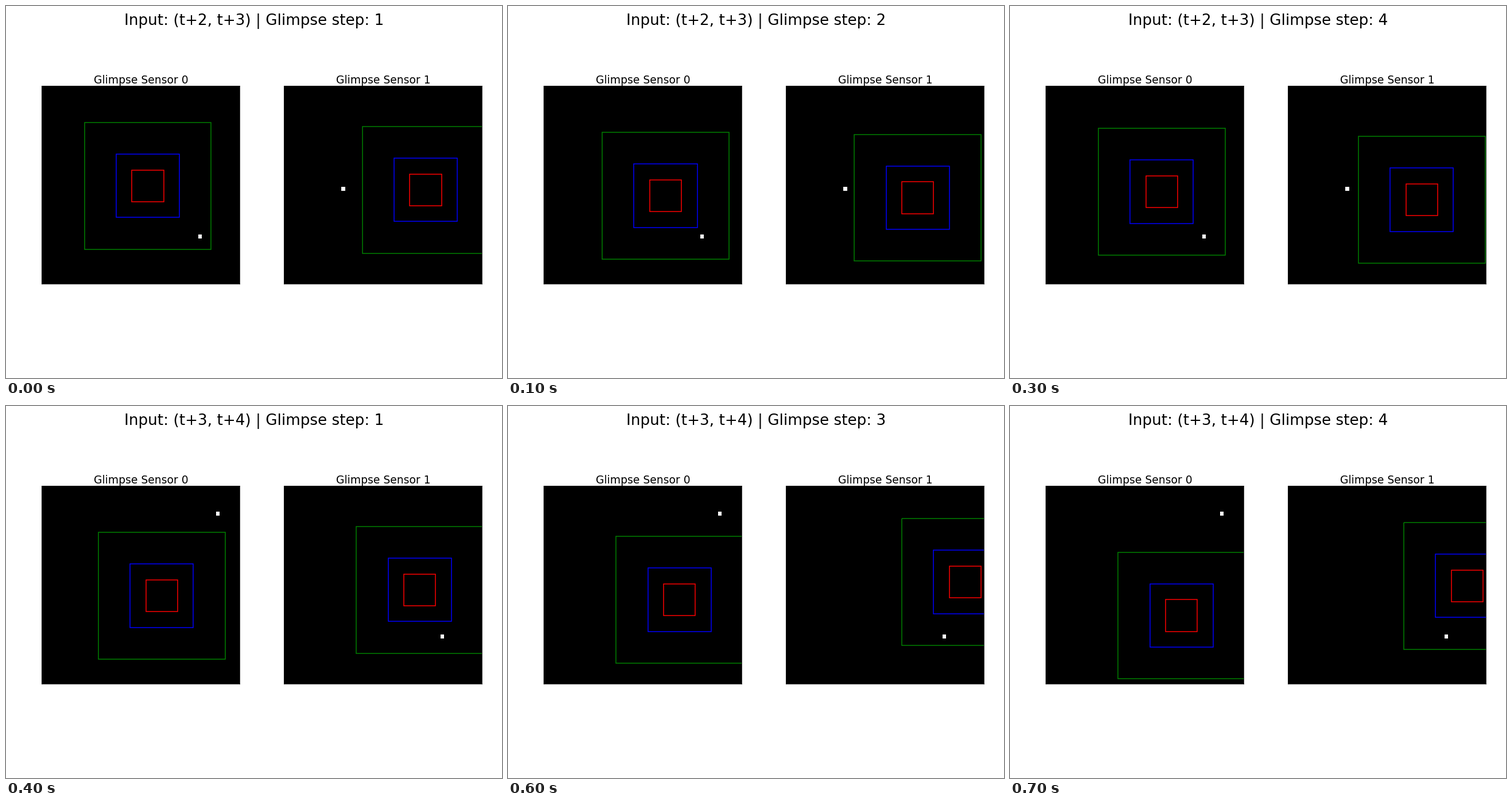
A matplotlib script that plays this animation: 864x648 px, repeating every 800 ms.

```python
import matplotlib.pyplot as plt
import numpy as np
from matplotlib.animation import FuncAnimation
from matplotlib.patches import Rectangle

WIDTH, HEIGHT, DPI = 864, 648, 54
GRID = 100                                # sensor resolution in cells
LEFT, TOP, SIDE, PITCH = 62.4, 139.05, 345, 422   # panels, in pixels
INPUTS, STEPS = 2, 4
COLORS = ("red", "blue", "green")         # each glimpse doubles in size

# The object's path over time; sensor 1 lags one time step behind sensor 0.
PATH = ((30, 52), (80, 76), (89, 14))

# Gaze at the first, second and last step, by sensor and input.
GAZE = (
    (((53, 50), (61, 55), (58, 53)), ((60, 55), (57, 51), (68, 65))),
    (((71, 52), (66, 56), (67, 57)), ((68, 52), (75, 46), (90, 50))),
)

plt.rcParams.update({
    "font.family": "DejaVu Sans",
    "axes.linewidth": 1,
    "text.kerning_factor": 6,
})


def gaze(sensor, block, step):
    """On the third step the gaze has settled sideways but not vertically."""
    first, second, last = GAZE[sensor][block]
    settling = last[0], round(second[1] + 0.4 * (last[1] - second[1]))
    return (first, second, settling, last)[step]


def scene(x, y):
    cells = np.zeros((GRID, GRID))
    cells[y - 1:y + 1, x - 1:x + 1] = 1
    return cells


class Sensor:
    def __init__(self, fig, index):
        self.index = index
        ax = fig.add_axes([(LEFT + index * PITCH) / WIDTH,
                           1 - (TOP + SIDE) / HEIGHT,
                           SIDE / WIDTH, SIDE / HEIGHT])
        ax.set_title(f"Glimpse Sensor {index}", fontsize=25, y=1, pad=5)
        ax.set(xticks=[], yticks=[])
        self.image = ax.imshow(np.zeros((GRID, GRID)), cmap="gray", vmin=0,
                               vmax=1, interpolation="nearest", aspect="auto")
        self.boxes = [
            ax.add_patch(Rectangle((0, 0), 16 * 2**i, 16 * 2**i, fill=False,
                                   edgecolor=color, linewidth=2))
            for i, color in enumerate(COLORS)
        ]

    def show(self, block, step):
        self.image.set_data(scene(*PATH[block + 1 - self.index]))
        x, y = gaze(self.index, block, step)
        for box in self.boxes:
            half = box.get_width() / 2
            box.set_xy((x - half, y - half))


fig = plt.figure(figsize=(WIDTH / DPI, HEIGHT / DPI), dpi=DPI,
                 facecolor="white")
heading = fig.suptitle("", fontsize=35)
sensors = [Sensor(fig, i) for i in range(2)]


def update(frame):
    block, step = divmod(frame, STEPS)
    heading.set_text(
        f"Input: (t+{block + 2}, t+{block + 3}) | Glimpse step: {step + 1}")
    for sensor in sensors:
        sensor.show(block, step)
    return []


anim = FuncAnimation(fig, update, frames=INPUTS * STEPS, interval=100,
                     repeat=True, repeat_delay=0, blit=False)
plt.show()
```
